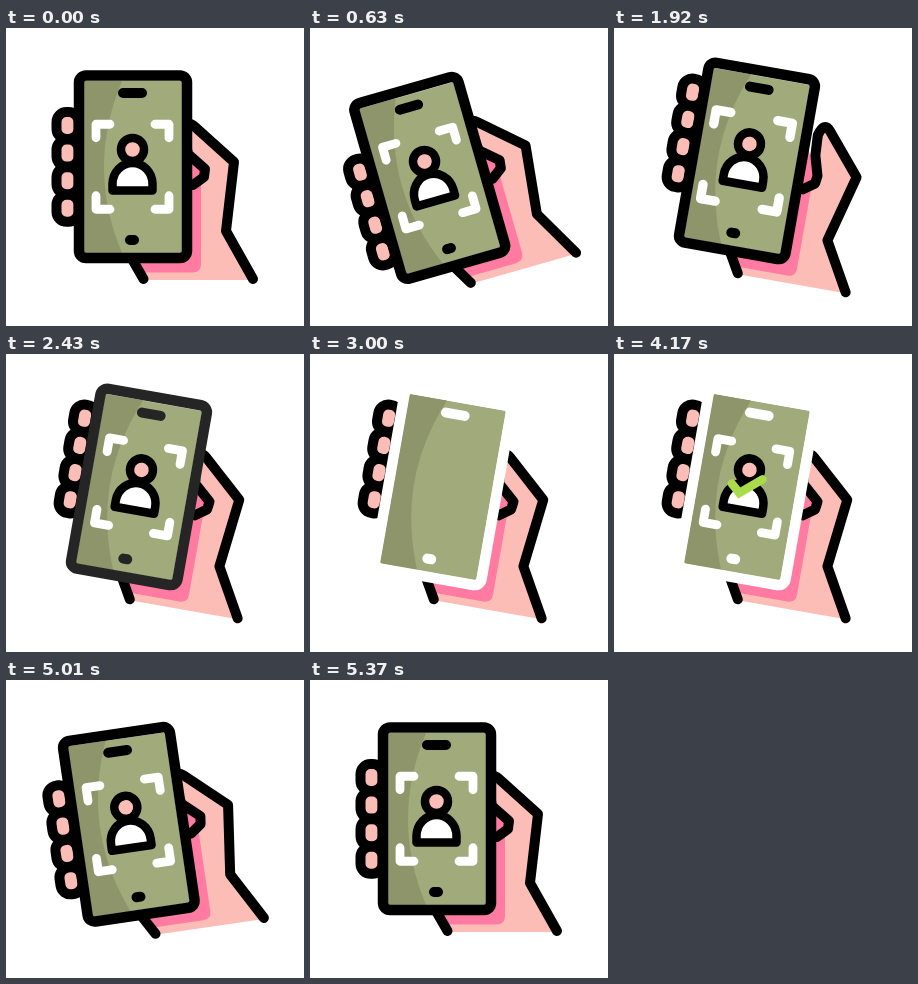
Recreate the animation shown at these times as an HTML page. Size 298x298 px, loop 5.4 s.

```html
<!DOCTYPE html>
<html lang="en">
<head>
<meta charset="utf-8">
<title>Face scan</title>
<style>
  html, body { margin: 0; width: 100%; height: 100%; overflow: hidden; background: #fff; }
  svg { display: block; width: 100%; height: 100%; }
  .line { fill: none; stroke: #000; stroke-width: 10; stroke-linecap: round; stroke-linejoin: round; }
  .skin { fill: #fdbdb7; }
  .palm { fill: #ff7ba2; }
</style>
</head>
<body>
<svg viewBox="0 0 298 298">
  <g id="all">
    <!-- hand -->
    <path class="palm" d="M172 118H186L198 142V158H172Z"/>
    <path class="skin" id="handFill"/>
    <path class="palm" d="M127 232L186 158L195 150V236Q195 244.500 186.500 244.500H133.500Z"/>
    <path class="line" id="handLine"/>
    <path class="line" d="M126 231L137.500 251"/>
    <g class="line" id="fingers"></g>

    <!-- phone -->
    <rect x="73" y="47" width="108" height="183" fill="#fff"/>
    <path fill="#a1aa7b" d="M78 53H176V225H78Z"/>
    <path fill="#8e956b" d="M78 53H116Q80 139 116 225H78Z"/>
    <g class="line" id="frame">
      <rect x="73" y="47.500" width="108" height="182.500" rx="7" stroke-width="10.500"/>
      <path d="M117 65H136M124 212H128"/>
    </g>

    <g id="target">
      <g id="corners"></g>
      <g stroke="#000" stroke-width="8.500" stroke-linejoin="round">
        <path fill="#fff" d="M106.500 162.500V156A20 21 0 0 1 146.500 156V162.500Z"/>
        <circle class="skin" cx="126.500" cy="121.500" r="11.500"/>
      </g>
    </g>
    <path id="check" d="M111.500 138L120.500 146L141 128.500" pathLength="100" fill="none"
          stroke="#aadb4a" stroke-width="8.500" stroke-linecap="round"/>
  </g>
</svg>
<script>
const LOOP = 5400, STEP = 30;
const $ = id => document.getElementById(id);
const add = (id, markup) => $(id).insertAdjacentHTML("beforeend", markup);

for (let i = 0; i < 4; i++) {
  add("fingers", `<rect class="skin" x="50.5" y="${84 + i * 27.6}" width="22" height="27" rx="10"/>`);
}
for (const sx of [-1, 1]) for (const sy of [-1, 1]) {
  add("corners", `<path class="line" style="stroke:#fff;stroke-width:8.8"
    transform="scale(${sx} ${sy})" d="M22.5 42.5H36.5V29"/>`);
}

// progress from 0 to 1 between two times
const linear = (t, a, b) => Math.min(1, Math.max(0, (t - a) / (b - a)));
const ease = (t, a, b) => 0.5 - 0.5 * Math.cos(Math.PI * linear(t, a, b));

// the thumb swings about the wrist bend, the crease stays
function handPath(degrees) {
  const r = degrees * Math.PI / 180, cos = Math.cos(r), sin = Math.sin(r);
  const swing = (x, y) => {
    const dx = x - 220, dy = y - 203;
    return `${220 + dx * cos - dy * sin} ${203 + dx * sin + dy * cos}`;
  };
  return `M247 251L220 203L${swing(228, 134)}L${swing(188, 98)}Q${swing(180, 91)} ${swing(178, 106)}`
    + `L${swing(182, 126)}L199 141L198 149L187 157`;
}

function draw(t) {
  const left = ease(t, 0, 620), right = ease(t, 1170, 1720);
  const back = ease(t, 4180, 4880), rest = ease(t, 4880, 5370);
  const angle = -16 * left + 26 * right - 20 * back + 10 * rest;
  const slide = 16.5 * left - 33.5 * right + 24 * back - 7 * rest;
  $("all").setAttribute("transform", `rotate(${angle} 163 170)`);
  $("fingers").setAttribute("transform", `translate(0 ${slide})`);

  const hand = handPath(8.8 * (ease(t, 1720, 1960) - ease(t, 1960, 2400)));
  $("handLine").setAttribute("d", hand);
  $("handFill").setAttribute("d", hand + "V232H127L137.500 252H247Z");

  const tone = Math.round(255 * (ease(t, 2300, 2820) - ease(t, 4180, 4500)));
  $("frame").style.stroke = `rgb(${tone},${tone},${tone})`;

  const zoom = 1 + 0.06 * right - 0.31 * ease(t, 2300, 2820)
    + 0.47 * ease(t, 3460, 3780) - 0.22 * ease(t, 3780, 4030);
  $("corners").setAttribute("transform", `translate(126.5 138.75) scale(${zoom})`);
  $("target").style.display = t >= 3000 && t < 3300 ? "none" : "";

  const from = 100 * linear(t, 4500, 4980), to = 100 * linear(t, 3960, 4170);
  const check = $("check");
  check.style.display = to > from ? "" : "none";
  check.setAttribute("stroke-dasharray", `${to - from} 300`);
  check.setAttribute("stroke-dashoffset", -from);
}

const start = performance.now();
function tick() {
  const t = (performance.now() - start) % LOOP;
  draw(Math.floor(t / STEP) * STEP);
  requestAnimationFrame(tick);
}
draw(0);
requestAnimationFrame(tick);
</script>
</body>
</html>
```
